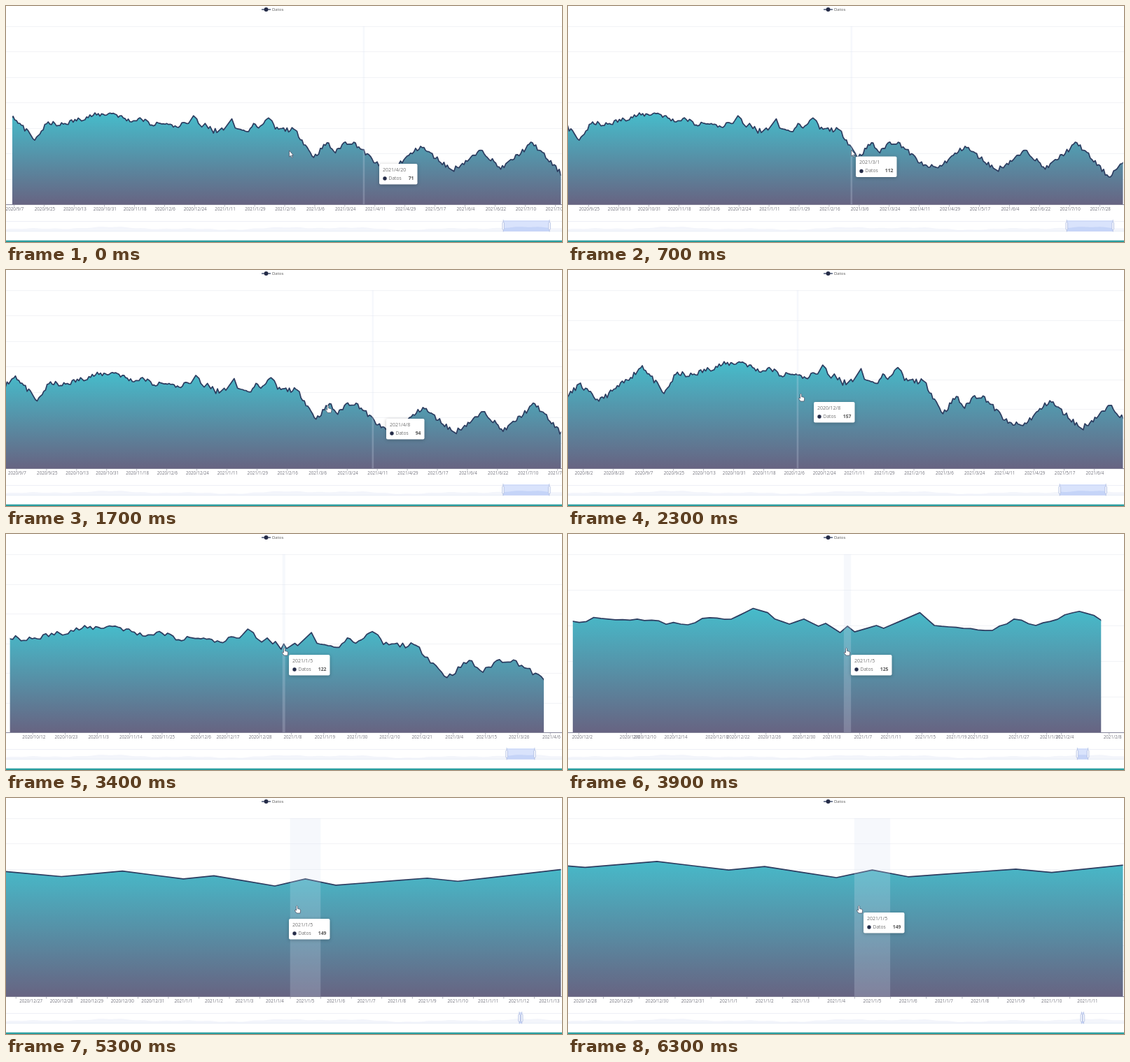
An HTML page with a canvas for the animation above (6.4 s loop, 794 px wide and 338 px high).

```html
<!DOCTYPE html>
<html lang="es">
<head>
<meta charset="utf-8">
<title>Datos</title>
<style>
  html, body { margin: 0; width: 100%; height: 100%; overflow: hidden; background: #fff; }
  canvas { display: block; width: 794px; height: 338px; }
</style>
</head>
<body>
<canvas id="chart"></canvas>
<script>
const W = 794, H = 338, TOP = 29, BASE = 284, LOOP = 6400;
const FONT = '"Open Sans", "Noto Sans", sans-serif';
const NAVY = '#2d3d60';
const canvas = document.getElementById('chart');
const ratio = window.devicePixelRatio || 1;
canvas.width = W * ratio;
canvas.height = H * ratio;
const g = canvas.getContext('2d');

// Value of column `col` at x, linear between rows that start with their x.
function along(rows, x, col = 1) {
  const i = rows.findIndex(row => x <= row[0]);
  if (i < 0) return rows[rows.length - 1][col];
  if (i === 0) return rows[0][col];
  const a = rows[i - 1], b = rows[i];
  return a[col] + (b[col] - a[col]) * (x - a[0]) / (b[0] - a[0]);
}

// Turning points [day, value]; day 0 is 2021/1/5.
const turns = [
  [-166, 119], [-159, 142], [-147, 113], [-128, 153], [-121, 173], [-108, 126], [-100, 162],
  [-94, 155], [-73, 175], [-61, 179], [-50, 162], [-45, 170], [-38, 156], [-33, 159],
  [-28, 157], [-22, 151], [-20, 160], [-16, 159], [-13, 174], [-11, 168], [-10, 159],
  [-8, 152], [-6, 159], [-4, 149], [-3, 153], [-1, 140], [0, 149], [1, 141], [4, 150],
  [5, 146], [10, 168], [12, 150], [16, 146], [20, 143], [23, 159], [26, 150], [30, 165],
  [33, 167], [36, 148], [48, 146], [59, 92], [67, 121], [72, 101], [77, 121], [83, 122],
  [98, 76], [107, 72], [123, 114], [142, 67], [160, 106], [171, 69], [190, 121], [209, 54],
  [217, 80], [224, 71]
];

// Daily series: the turns, with a jitter that fades out around day 0.
let seed = 11;
const random = () => (seed = (seed * 16807) % 2147483647) / 2147483647;
const known = new Map(turns);
const values = new Map();
for (let d = -200; d <= 260; d++) {
  const jitter = (random() - 0.5) * 9 * Math.min(1, Math.max(0, (Math.abs(d) - 12) / 25));
  values.set(d, known.get(d) ?? along(turns, d) + jitter);
}

// [ms, log of px per day, x of day 0, top of the value axis]
const view = [
  [0, 2.385, 298.7, 350], [1200, 2.385, 255.7, 350], [1500, 2.385, 255.7, 350],
  [2100, 2.385, 394.7, 300], [2900, 2.385, 394.7, 300], [3400, 3.95, 396.7, 300],
  [3900, 10.35, 399, 250], [4500, 34.1, 417, 250], [5000, 34.1, 417, 250],
  [5500, 51.25, 434.5, 210]
].map(([t, s, ...rest]) => [t, Math.log(s), ...rest]);

// [ms, x, y]
const mouse = [
  [-300, 527, 222], [-165, 512, 220], [0, 405, 212], [840, 405, 211], [1300, 537, 209],
  [1500, 537, 209], [2000, 345, 185], [2135, 328, 184], [2300, 333, 183], [2700, 398, 169],
  [5000, 398, 169], [5300, 416, 160]
];

function dateText(d) {
  const date = new Date(Date.UTC(2021, 0, 5 + d));
  return `${date.getUTCFullYear()}/${date.getUTCMonth() + 1}/${date.getUTCDate()}`;
}

function text(str, x, y, size, color, align = 'left', weight = 400) {
  g.font = `${weight} ${size}px ${FONT}`;
  g.textAlign = align;
  g.textBaseline = 'middle';
  g.fillStyle = color;
  g.fillText(str, x, y);
}

function rect(x, y, w, h, color) {
  g.fillStyle = color;
  g.fillRect(x, y, w, h);
}

function dot(x, y, r, color) {
  g.fillStyle = color;
  g.beginPath();
  g.arc(x, y, r, 0, Math.PI * 2);
  g.fill();
}

function drawLegend() {
  rect(365, 4.4, 13, 1.3, NAVY);
  dot(371.5, 5, 3, '#252c48');
  text('Datos', 380, 5, 6, '#555');
}

function drawGrid(top) {
  const n = top < 230 ? 7 : Math.round(top / 50);
  for (let i = 0; i < n; i++) {
    rect(0, Math.round(TOP + (BASE - TOP) * i / n), W, 1, '#f2f3f6');
  }
}

// While zooming, the cut of the data and new labels already use the wider scale `wide`.
function drawCurve(t, s, c, wide, top) {
  const left = Math.max(0, 9 - t / 30, (wide / s - 1) * 90);
  const right = wide > s ? c + Math.floor((W - c) / wide) * s : W - 1.5;
  const from = Math.floor(-c / s) - 1, to = Math.ceil((W - c) / s) + 1;
  const line = new Path2D(), area = new Path2D();
  let peak = BASE;
  area.moveTo(c + from * s, BASE);
  for (let d = from; d <= to; d++) {
    const x = c + d * s, y = BASE - (BASE - TOP) * values.get(d) / top;
    line.lineTo(x, y);
    area.lineTo(x, y);
    peak = Math.min(peak, y);
  }
  area.lineTo(c + to * s, BASE);
  const fill = g.createLinearGradient(0, peak, 0, BASE);
  fill.addColorStop(0, '#46bccb');
  fill.addColorStop(1, '#676482');
  g.save();
  g.beginPath();
  g.rect(left, 0, right - left, BASE);
  g.clip();
  g.fillStyle = fill;
  g.fill(area);
  g.strokeStyle = NAVY;
  g.lineWidth = 1.7;
  g.lineJoin = 'round';
  g.stroke(line);
  g.restore();
}

function drawAxis(s, c, wide) {
  rect(0, BASE, W, 1, '#85859a');
  const step = [1, 2, 4, 11].find(n => n * s > 40) || 18;
  // Labels shared with the previous step still travel with the curve.
  const shared = { 4: 12, 11: 198 }[step] || step;
  const first = Math.floor((30 - c / s) / step) - 1;
  const last = Math.ceil((30 + (W - c) / s) / step) + 1;
  for (let k = first; k <= last; k++) {
    const n = k * step, d = n - 30;
    const x = c + d * (n % shared === 0 ? s : wide);
    if (x < 0 || x > W - 2) continue;
    rect(x - s / 2, BASE + 1, 0.7, 2.5, '#9a9aa8');
    text(dateText(d), x, 291, 6.2, '#74747e', 'center');
  }
}

function miniArea(from, to, color) {
  g.beginPath();
  g.moveTo(from, 322);
  for (let x = from; x <= to; x += 2) {
    g.lineTo(x, 318.5 - 1.3 * Math.sin(x / 47 - 1.5) - 0.9 * Math.sin(x / 19) - 0.4 * Math.sin(x / 5));
  }
  g.lineTo(to, 322);
  g.fillStyle = color;
  g.fill();
}

function drawSlider(s, c) {
  const perDay = 0.198;
  const a = 735 - perDay * c / s, b = a + perDay * W / s;
  miniArea(0, W, '#f3f5fb');
  rect(0, 308, W, 0.8, '#e9ecf6');
  rect(0, 322.3, W, 0.8, '#e3e7f4');
  rect(a, 307, b - a, 16, 'rgba(150, 178, 245, .36)');
  miniArea(a, b, 'rgba(130, 160, 235, .16)');
  g.strokeStyle = '#aebbe0';
  g.lineWidth = 0.8;
  for (const x of [a, b]) {
    g.beginPath();
    g.moveTo(x, 306);
    g.lineTo(x, 323.5);
    g.stroke();
    g.beginPath();
    g.roundRect(x - 1.3, 309.5, 2.6, 11, 1.3);
    g.fillStyle = '#f7f9ff';
    g.fill();
    g.stroke();
  }
  rect(0, 335.7, W, 2.3, '#2a9ea0');
}

// The tooltip trails the pointer; its reading is refreshed late at the start and while zooming.
function drawTip(t, day) {
  const shown = t < 500 ? 105 : day;
  const value = t < 500 ? 71
    : t < 2900 ? Math.round(values.get(day))
    : t < 3600 ? 122
    : t < 5200 ? 125 : 149;
  const x = along(mouse, t - 300, 1) + 6, y = along(mouse, t - 300, 2) + 4;
  const w = value > 99 ? 58.5 : 54.5;
  g.save();
  g.shadowColor = 'rgba(0, 0, 0, .25)';
  g.shadowBlur = 5 * ratio;
  g.shadowOffsetY = ratio;
  g.fillStyle = '#fff';
  g.beginPath();
  g.roundRect(x, y, w, 29.5, 2);
  g.fill();
  g.restore();
  text(dateText(shown), x + 5, y + 9, 7, '#707070');
  dot(x + 8, y + 21, 2.7, '#252c48');
  text('Datos', x + 13.5, y + 21, 6.7, '#707070');
  text(String(value), x + w - 5, y + 21, 6.8, '#555', 'right', 700);
}

const arrow = new Path2D('M-1-5V4L1 2.3 2.6 5.4 3.8 4.8 2.4 1.8H5Z');
const hand = new Path2D('M-2-5Q-1-6.5 0-5V-1.5Q4-1.5 4.3 1L3.6 5H-1.4L-4.3 1Q-4-.6-2 1Z');

function drawMouse(t) {
  g.save();
  g.translate(along(mouse, t, 1) + 0.5, along(mouse, t, 2));
  const shape = t < 1200 ? arrow : hand;
  g.fillStyle = '#fff';
  g.strokeStyle = '#4c5468';
  g.lineWidth = 0.8;
  g.fill(shape);
  g.stroke(shape);
  g.restore();
}

function draw(now) {
  const t = Math.floor((now % LOOP) / 100) * 100;
  const s = Math.exp(along(view, t, 1)), c = along(view, t, 2), top = along(view, t, 3);
  const zooming = t > 2900 && t < 4600 ? Math.sin(Math.PI * (t - 2900) / 1700) : 0;
  const wide = s * (1 + 0.079 * zooming);
  const day = t < 2900 ? Math.round((along(mouse, t - 165) - c) / s) : 0;
  const band = Math.max(s, 2.6);
  g.setTransform(ratio, 0, 0, ratio, 0, 0);
  rect(0, 0, W, H, '#fff');
  drawLegend();
  drawGrid(top);
  drawCurve(t, s, c, wide, top);
  rect(c + day * s - band / 2, TOP, band, BASE - TOP, 'rgba(214, 222, 242, .23)');
  drawAxis(s, c, wide);
  drawSlider(s, c);
  drawTip(t, day);
  drawMouse(t);
}

const start = performance.now();
function tick() {
  draw(performance.now() - start);
  requestAnimationFrame(tick);
}
tick();
</script>
</body>
</html>
```
